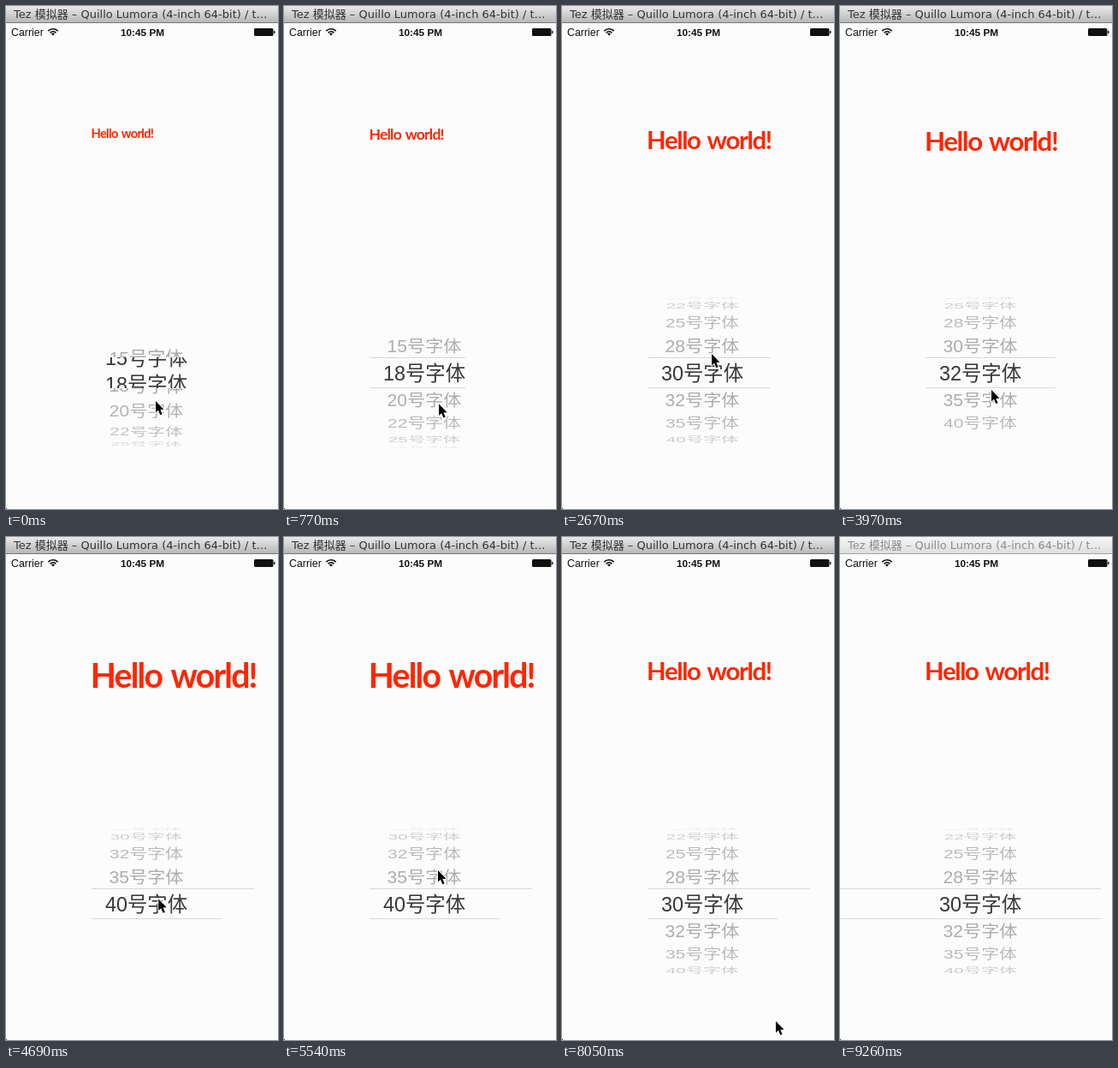
Recreate the animation shown at these times as an HTML page with a canvas. Size 318 by 587 pixels, loop 9380 ms.

```html
<!DOCTYPE html>
<html lang="zh">
<head>
<meta charset="utf-8">
<title>Font picker</title>
<style>
html, body { margin: 0; width: 100%; height: 100%; overflow: hidden; background: #fcfcfc; }
canvas { display: block; width: 318px; height: 587px; }
</style>
</head>
<body>
<canvas id="stage"></canvas>
<script>
const W = 318, H = 587, LOOP = 9380, TICK = LOOP / 65;
const SIZES = [15, 18, 20, 22, 25, 28, 30, 32, 35, 40];
const SANS = '"Liberation Sans", "Noto Sans CJK SC", "Noto Sans CJK", sans-serif';
const BAND = { top: 410, bottom: 446, mid: 428 };
const WHEEL = { x: 164, right: 212, radius: 87, angle: 0.37 };
const LABEL = { x: 100, y: 140, width: 4.76 };
const REFRESH = 63; // tick at which the whole window is repainted

// Wheel flicks: [start tick, ticks, row reached]
const FLICKS = [[-2, 6, 1], [8, 4, 3], [15, 3, 6], [24, 3, 7], [28, 4, 9], [39, 4, 6.06], [48, 1, 6]];

// Pointer stops: [tick, x, y]
const STOPS = [[0, 175, 461], [8, 184, 466], [11, 187, 435], [18, 175, 406], [23, 176, 468],
  [27, 177, 448], [38, 180, 389], [43, 177, 464], [51, 177, 464], [58, 268, 590]];

const canvas = document.getElementById('stage');
const ctx = canvas.getContext('2d');
const dpr = window.devicePixelRatio || 1;
canvas.width = W * dpr;
canvas.height = H * dpr;

const easeOut = u => 1 - (1 - u) ** 2;
const smooth = u => u * u * (3 - 2 * u);
const mix = (a, b, u) => a + (b - a) * u;
const clamp = u => Math.min(1, Math.max(0, u));

function wheelRow(tick) {
  return FLICKS.reduce((row, [start, ticks, to]) =>
    mix(row, to, easeOut(clamp((tick - start) / ticks))), 0);
}

// Sizes applied so far: the label follows each whole row the wheel settles on
function appliedSizes(tick) {
  const settled = FLICKS.filter(([start, ticks, row]) => start + ticks <= tick && row % 1 === 0);
  return [SIZES[0], ...settled.map(f => SIZES[f[2]])];
}

function pointerAt(tick) {
  const i = STOPS.findIndex(s => s[0] > tick);
  if (i < 0) return null;
  const [t0, x0, y0] = STOPS[i - 1], [t1, x1, y1] = STOPS[i];
  const u = smooth((tick - t0) / (t1 - t0));
  return [mix(x0, x1, u), mix(y0, y1, u)];
}

function text(str, x, y, font, color, align = 'left') {
  ctx.font = font;
  ctx.fillStyle = color;
  ctx.textAlign = align;
  ctx.fillText(str, x, y);
}

function rect(x, y, w, h, color) {
  ctx.fillStyle = color;
  ctx.fillRect(x, y, w, h);
}

function clipped(boxes, draw) {
  ctx.save();
  ctx.beginPath();
  for (const [y, h] of boxes) ctx.rect(0, y, W, h);
  ctx.clip();
  draw();
  ctx.restore();
}

function titleBar(inactive) {
  const shade = ctx.createLinearGradient(0, 0, 0, 19);
  shade.addColorStop(0, inactive ? '#f6f6f6' : '#e9e9e9');
  shade.addColorStop(1, inactive ? '#dedede' : '#b8b8b8');
  rect(0, 0, W, 19, shade);
  rect(0, 19, W, 1, inactive ? '#a4a4a4' : '#777');
  text('Tez 模拟器 – Quillo Lumora (4-inch 64-bit) / t…', 9, 14,
    '13px "DejaVu Sans", "Noto Sans CJK SC", "Noto Sans CJK", sans-serif',
    inactive ? '#8c8c8c' : '#333');
}

function statusBar() {
  text('Carrier', 6, 34.5, '12.4px ' + SANS, '#111');
  text('10:45 PM', 159.5, 34.5, 'bold 11.8px ' + SANS, '#111', 'center');
  const fan = r => ctx.arc(55, 34.5, r, -Math.PI * .76, -Math.PI * .24);
  ctx.strokeStyle = '#111';
  ctx.lineWidth = 1.6;
  for (const r of [4.6, 7.8]) {
    ctx.beginPath();
    fan(r);
    ctx.stroke();
  }
  ctx.fillStyle = '#111';
  ctx.beginPath();
  ctx.moveTo(55, 34.5);
  fan(2.8);
  ctx.fill();
  ctx.beginPath();
  ctx.roundRect(290, 26, 22.5, 9, 1.5);
  ctx.fill();
  rect(313, 29, 1.5, 3, '#222');
}

function label(size) {
  ctx.letterSpacing = -.046 * size + 'px';
  ctx.wordSpacing = .07 * size + 'px';
  text('Hello world!', LABEL.x - size * .03, LABEL.y + size * .9,
    `bold ${size * .98}px Lato, "Open Sans", sans-serif`, '#ff2600');
  ctx.letterSpacing = ctx.wordSpacing = '0px';
}

function wheelText(size, y, px, squash, color) {
  ctx.save();
  ctx.translate(WHEEL.x, y);
  ctx.scale(1, squash);
  text(size + '号字体', 0, px * .37, px + 'px ' + SANS, color, 'center');
  ctx.restore();
}

function wheel(pos) {
  clipped([[330, BAND.top - 330], [BAND.bottom, 80]], () => {
    SIZES.forEach((size, i) => {
      const a = (i - pos) * WHEEL.angle, c = Math.cos(a);
      if (Math.abs(a) > 1.54) return;
      wheelText(size, BAND.mid + WHEEL.radius * Math.sin(a), 20 + 1.2 * c, Math.max(c, .12),
        `rgba(0,0,0,${.08 + .25 * c})`);
    });
  });
  clipped([[BAND.top, BAND.bottom - BAND.top]], () => {
    SIZES.forEach((size, i) => wheelText(size, BAND.mid + (i - pos) * 31, 23.4, 1, '#383838'));
  });
}

function bandLines(tick, sizes) {
  if (tick < 1) return;
  const full = tick >= REFRESH;
  const left = full ? 0 : LABEL.x;
  const right = full ? 305 : Math.max(WHEEL.right, Math.round(LABEL.x + LABEL.width * Math.max(...sizes)));
  rect(left, BAND.top, right - left, 1, '#d9d9d9');
  rect(left, BAND.bottom - 1, (full ? right : Math.min(right, 252)) - left, 1, '#d9d9d9');
}

function pointer(x, y) {
  ctx.save();
  ctx.translate(x, y);
  ctx.beginPath();
  [[0, 0], [0, 13.5], [3, 10.8], [5.3, 16.2], [7.6, 15.2], [5.3, 10], [9.5, 9.8]]
    .forEach(p => ctx.lineTo(...p));
  ctx.closePath();
  ctx.lineJoin = 'round';
  ctx.lineWidth = 2;
  ctx.strokeStyle = '#fff';
  ctx.stroke();
  ctx.fillStyle = '#000';
  ctx.fill();
  ctx.restore();
}

function draw(ms) {
  const tick = Math.floor(ms / TICK + .35);
  const sizes = appliedSizes(tick);
  const tip = pointerAt(tick);
  ctx.setTransform(dpr, 0, 0, dpr, 0, 0);
  rect(0, 0, W, H, '#fcfcfc');
  titleBar(tick >= REFRESH);
  statusBar();
  label(sizes[sizes.length - 1]);
  wheel(wheelRow(tick));
  bandLines(tick, sizes);
  rect(0, H - 1, 1, 1, '#333');
  if (tip) pointer(...tip);
}

const start = performance.now();
function loop() {
  draw((performance.now() - start) % LOOP);
  requestAnimationFrame(loop);
}
loop();
</script>
</body>
</html>
```
